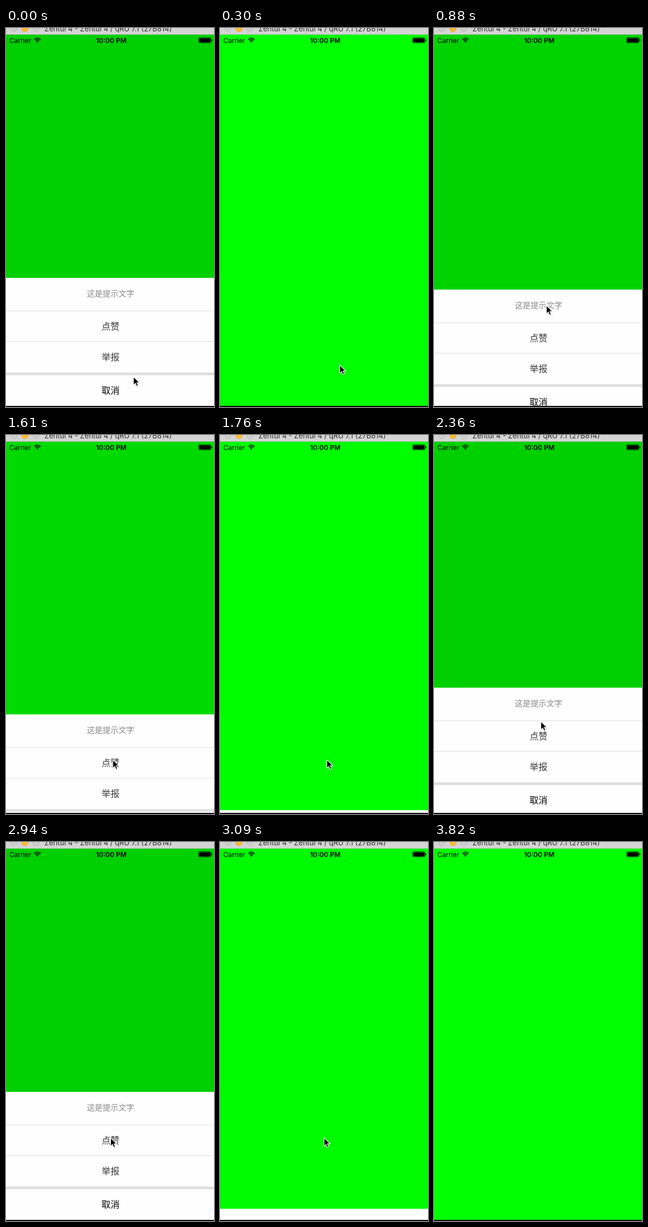
These frames come from a looping animation (373x681 px, 3970 ms). An HTML page:

```html
<!DOCTYPE html>
<html lang="zh-CN">
<head>
<meta charset="utf-8">
<title>Action sheet</title>
<style>
  html, body { margin: 0; width: 100%; height: 100%; overflow: hidden; background: #000; }
  svg { display: block; width: 373px; height: 681px; }
  text { font-family: Inter, Roboto, sans-serif; font-size: 12px; }
  #sheet text { font-family: "Noto Sans CJK SC", "Noto Sans CJK", "Noto Sans", sans-serif; font-size: 16px; text-anchor: middle; fill: #333; }
  #sheet .hint { font-size: 14.2px; fill: #888; }
  #sheet .cancel { fill: #000; }
</style>
</head>
<body>
<svg viewBox="0 0 373 681">
  <defs>
    <clipPath id="screen"><rect y="12" width="373" height="667"/></clipPath>
  </defs>
  <rect width="373" height="681" fill="#0b0b0b"/>

  <g id="titlebar">
    <rect width="373" height="12" fill="#d4d4d4"/>
    <rect y="11" width="373" height="1" fill="#bdbdbd"/>
    <g stroke-width="1">
      <circle cx="14" cy="1" r="5.5" fill="#cecece" stroke="#b9b9b9"/>
      <circle cx="34" cy="1" r="5.5" fill="#fdbd30" stroke="#e0a32a"/>
      <circle cx="54" cy="1" r="5.5" fill="#cecece" stroke="#b9b9b9"/>
    </g>
    <text x="69" y="6" style="font-size:13px" fill="#2c2c2c">Zentul 4 - Zentul 4 / qRU 7.1 (27B814)</text>
  </g>

  <g clip-path="url(#screen)">
    <rect id="back" y="12" width="373" height="667" fill="#0f0"/>
    <text x="6" y="26.5">Carrier</text>
    <g fill="none" stroke="#000" stroke-width="1.6">
      <path d="M50.7 20.6Q56.3 15.4 61.9 20.6"/>
      <path d="M52.7 22.7Q56.3 19.4 59.9 22.7"/>
    </g>
    <path d="M54.2 24.2Q56.3 22.4 58.4 24.2L56.3 26.4Z"/>
    <text x="188.8" y="26.5" text-anchor="middle" font-weight="600">10:00 PM</text>
    <rect x="345.5" y="17.5" width="22" height="9.2" rx="1.6" fill="none" stroke="#000" stroke-opacity=".75"/>
    <rect x="346.5" y="18.5" width="20" height="7.2" rx=".6"/>
    <path d="M368.4 20.3Q370 20.6 370 22.1T368.4 23.9Z"/>

    <g id="sheet">
      <rect width="373" height="240" fill="#fefefe"/>
      <rect y="59" width="373" height="1" fill="#dfdfdf"/>
      <rect y="114" width="373" height="1" fill="#dfdfdf"/>
      <rect y="170" width="373" height="5" fill="#dfdfdf"/>
      <text class="hint" x="187.5" y="32.8">这是提示文字</text>
      <text x="187.5" y="92.5">点赞</text>
      <text x="187.5" y="147.5">举报</text>
      <text class="cancel" x="187.5" y="207.8">取消</text>
    </g>
  </g>

  <g id="cursor">
    <path d="M1 1.5V17.5L4.6 14.2L7 19.4L10 18.1L7.7 13.2H12.4Z" fill="#000" opacity=".18"/>
    <path d="M.6 .6V15.6L4 12.4L6.3 17.7L9 16.5L6.7 11.4H11.4Z" fill="#000" stroke="#fff" stroke-width="1.1"/>
  </g>
</svg>
<script>
  const LOOP = 3970, SLIDE = 250, OPEN_Y = 449, SHEET_H = 230, DIM = 0.19;

  // the screen refreshes only at these times
  const TICKS = [0, 150, 300, 440, 590, 730, 880, 1030, 1170, 1320, 1470, 1610, 1760, 1910,
    2060, 2210, 2360, 2500, 2650, 2800, 2950, 3090, 3230, 3380, 3530, 3680, 3820];

  // [start, direction]: -1 closes the sheet, 1 opens it
  const SLIDES = [[25, -1], [677, 1], [1532, -1], [2132, 1], [2886, -1]];

  // [time, x, y] of the pointer tip
  const PATH = [[0, 228, 626], [300, 214, 605], [590, 202, 500], [880, 201, 498],
    [1170, 192, 587], [1320, 191, 583], [1760, 191, 583], [2210, 191, 516], [2360, 191, 514],
    [2650, 187, 531], [3090, 186, 531], [3680, 200, 672]];

  const byId = id => document.getElementById(id);
  const back = byId('back'), sheet = byId('sheet'), cursor = byId('cursor');
  const clamp = u => Math.min(1, Math.max(0, u));
  const smooth = u => u * u * (3 - 2 * u);

  const openness = t => SLIDES.reduce(
    (sum, [start, dir]) => sum + dir * smooth(clamp((t - start) / SLIDE)), 1);

  function pointerAt(t) {
    const i = PATH.findIndex(p => p[0] >= t);
    if (i < 0) return null;
    if (i === 0) return PATH[0].slice(1);
    const [t0, x0, y0] = PATH[i - 1], [t1, x1, y1] = PATH[i];
    const u = smooth((t - t0) / (t1 - t0));
    return [x0 + (x1 - x0) * u, y0 + (y1 - y0) * u].map(Math.round);
  }

  function draw(time) {
    const now = time % LOOP;
    const t = TICKS.filter(k => k <= now + 0.01).pop() || 0;
    const shown = openness(t);
    back.setAttribute('fill', `rgb(0,${Math.round(255 * (1 - DIM * shown))},0)`);
    sheet.setAttribute('transform', `translate(0 ${Math.round(OPEN_Y + SHEET_H * (1 - shown))})`);
    const tip = pointerAt(t);
    cursor.style.display = tip ? '' : 'none';
    if (tip) cursor.setAttribute('transform', `translate(${tip[0]} ${tip[1]})`);
  }

  const began = performance.now();
  function loop() {
    draw(performance.now() - began);
    requestAnimationFrame(loop);
  }
  loop();
</script>
</body>
</html>
```
